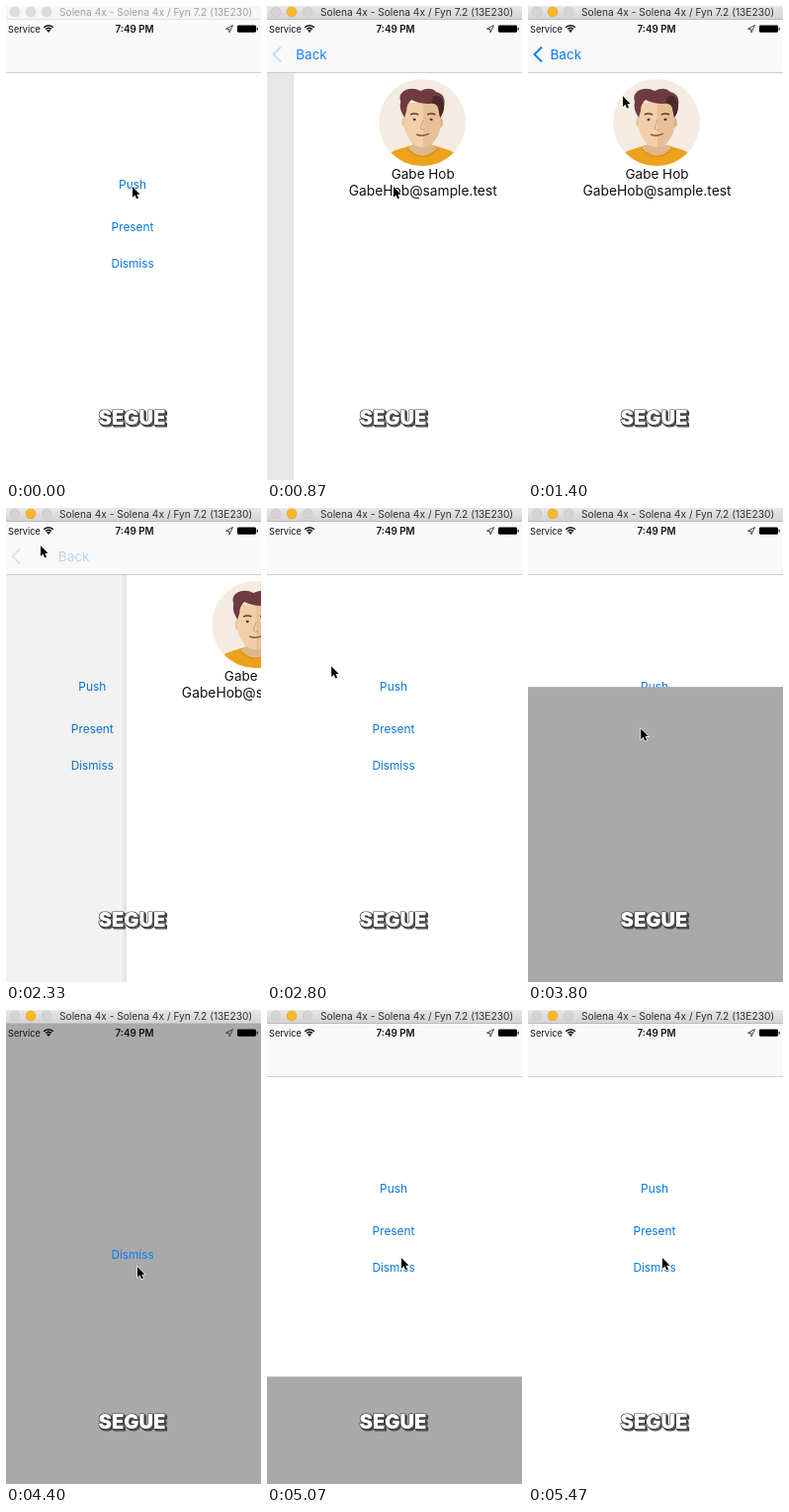
An HTML page with a canvas that plays this animation: 258x480 px, repeating every 5740 ms.

```html
<!DOCTYPE html>
<html lang="en">
<head>
<meta charset="utf-8">
<title>Segue demo</title>
<style>
html, body { margin: 0; width: 100%; height: 100%; overflow: hidden; background: #fff; }
canvas { display: block; width: 258px; height: 480px; }
</style>
</head>
<body>
<canvas id="stage"></canvas>
<script>
const W = 258, H = 480, LOOP = 5740, TOP = 14;
const PUSH = 660, POP = 2247, PRESENT = 3682, DISMISS = 4916;
const LINK = '#0b76d8', TINT = '#087bfa';
const SANS = 'Inter, "Liberation Sans", sans-serif';

const canvas = document.getElementById('stage');
const ratio = window.devicePixelRatio || 1;
canvas.width = W * ratio;
canvas.height = H * ratio;
const c = canvas.getContext('2d');

// Pointer keys: time, x, y
const pointerKeys = [
  [0, 128, 183], [190, 115, 219], [330, 113, 250], [440, 115, 228],
  [610, 128, 183], [880, 128, 183], [1200, 151, 148],
  [1470, 85, 80], [1740, 12, 22], [2070, 35, 38], [2410, 35, 38],
  [2740, 62, 150], [3040, 92, 249], [3330, 106, 232], [3500, 114, 222.5],
  [3760, 114, 222.5], [4200, 122, 264], [4400, 133, 260],
  [4670, 136, 251], [LOOP, 136, 251]
];

const clamp = v => Math.min(1, Math.max(0, v));

// Critically damped spring from 0 to 1
function spring(ms) {
  const x = Math.max(0, ms) * 0.0185;
  return ms > 530 ? 1 : 1 - (1 + x) * Math.exp(-x);
}

function pointerAt(t) {
  const i = Math.max(1, pointerKeys.findIndex(k => k[0] >= t));
  const [t0, x0, y0] = pointerKeys[i - 1], [t1, x1, y1] = pointerKeys[i];
  const u = clamp((t - t0) / (t1 - t0)), e = u * u * (3 - 2 * u);
  return [x0 + (x1 - x0) * e, y0 + (y1 - y0) * e];
}

// Opacity of a button held from down to up, then fading back
function pressAlpha(t, down, up) {
  return t < down ? 1 : 0.2 + 0.8 * clamp((t - up) / 400);
}

function rect(x, y, w, h, color) {
  c.fillStyle = color;
  c.fillRect(x, y, w, h);
}

function disc(x, y, rx, ry, color) {
  c.fillStyle = color;
  c.beginPath();
  c.ellipse(x, y, rx, ry, 0, 0, 7);
  c.fill();
}

function shape(path, color) {
  c.fillStyle = color;
  c.fill(new Path2D(path));
}

function line(path, color, width) {
  c.strokeStyle = color;
  c.lineWidth = width;
  c.stroke(new Path2D(path));
}

function text(str, x, y, size, color, { align = 'center', weight = 400, alpha = 1 } = {}) {
  c.globalAlpha = alpha;
  c.font = `${weight} ${size}px ${SANS}`;
  c.textAlign = align;
  c.fillStyle = color;
  c.fillText(str, x, y);
  c.globalAlpha = 1;
}

function drawAvatar(x, y) {
  c.save();
  c.translate(x, y);
  c.beginPath();
  c.arc(0, 0, 44, 0, 7);
  c.clip();
  rect(-44, -44, 88, 88, '#f4ece3');
  shape('M-40 46 Q-37 30 -24 27 L-11 23 H11 L24 27 Q37 30 40 46Z', '#eda21c');
  shape('M-10 12 H10 V23 L15 26 Q0 41 -15 26 L-10 23Z', '#dfb78c');
  line('M-16 26 Q0 43 16 26', '#d9931a', 1.2);
  disc(-18, 0, 2.8, 5, '#ecc79e');
  disc(18, 0, 2.8, 5, '#dcb287');
  shape('M-18 -20 H18 V6 Q16 16 8 23 Q0 27 -8 23 Q-16 16 -18 6Z', '#f1cfa8');
  shape('M1 -20 H18 V6 Q16 16 8 23 Q4 26 1 25Z', '#e6c096');
  shape('M-18 -5 Q-24 -14 -22 -21 Q-25 -29 -17 -33 Q-9 -36 -2 -32 Q8 -37 14 -31 Q24 -29 22 -17 Q22 -10 18 -5 L16 -15 Q14 -20 7 -19 Q-4 -19 -11 -23 Q-16 -19 -16 -12Z', '#703b40');
  shape('M11 -26 Q19 -30 22 -19 Q22 -10 18 -5 L16 -15 Q15 -19 9 -20Z', '#4b282c');
  line('M-12 -8 Q-8 -10 -4 -8 M5 -8 Q9 -10 13 -8', '#623735', 1.6);
  disc(-8, -3, 1.5, 1.2, '#543331');
  disc(9, -3, 1.5, 1.2, '#543331');
  line('M1 -3 L-2 6 Q0 8 3 7', '#cfa077', 1);
  line('M-6 12 Q1 15 7 11', '#8d4e40', 1.4);
  c.restore();
}

function drawMenu(shift, t) {
  const x = 128 + shift;
  text('Push', x, 185, 11.9, LINK, { alpha: t < 1200 ? pressAlpha(t, 630, 700) : 1 });
  text('Present', x, 228, 11.9, LINK, { alpha: pressAlpha(t, 3520, 3690) });
  text('Dismiss', x, 265, 11.8, LINK);
}

function drawProfile(shown) {
  const left = W * (1 - shown);
  rect(0, TOP, left, H, `rgba(0,0,0,${0.1 * shown})`);
  const shade = c.createLinearGradient(left - 6, 0, left, 0);
  shade.addColorStop(0, 'rgba(0,0,0,0)');
  shade.addColorStop(1, `rgba(0,0,0,${0.16 * (1 - shown)})`);
  rect(left - 6, TOP, 6, H, shade);
  rect(left, TOP, W, H, '#fff');
  drawAvatar(left + 130, 118);
  text('Gabe Hob', left + 130.5, 175, 13.5, '#111');
  text('GabeHob@sample.test', left + 130.5, 192, 13.8, '#111');
}

// The label appears early and the chevron late; both fade out quickly
function drawNavBar(shown, leaving) {
  rect(0, TOP, W, 53, '#f9f9f9');
  rect(0, 67, W, 0.8, '#c4c4c4');
  if (shown < 0.01) return;
  const alpha = shown ** (leaving ? 2 : 0.6);
  text('Back', 22.5 + 64 * (1 - shown), 54, 13.5, TINT, { align: 'left', alpha });
  c.globalAlpha = shown ** (leaving ? 3 : 14);
  line('M14 41.5 L6.5 49 L14 56.5', TINT, 1.9);
  c.globalAlpha = 1;
}

function drawSheet(up, t) {
  const y = TOP + (H - TOP) * (1 - up);
  rect(0, y, W, H - y, '#a9a9a9');
  text('Dismiss', 128, y + 238, 11.8, TINT, { alpha: pressAlpha(t, DISMISS, DISMISS) });
}

function drawStatusBar() {
  text('Service', 2, 27, 9.2, '#111', { align: 'left' });
  text('7:49 PM', 130, 27, 9.8, '#111', { weight: 600 });
  for (const r of [6.3, 3.7]) {
    c.beginPath();
    c.arc(43, 26, r, -Math.PI * 0.77, -Math.PI * 0.23);
    c.strokeStyle = '#111';
    c.lineWidth = 1.6;
    c.stroke();
  }
  shape('M43 27 L41 24.6 Q43 23 45 24.6Z', '#111');
  line('M222.5 23.2 L229.5 19.5 L226 26.8 L225.7 23.5Z', '#333', 0.9);
  c.fillStyle = '#000';
  c.beginPath();
  c.roundRect(234, 19.4, 19, 7.4, 1.4);
  c.fill();
  rect(253.6, 21.8, 1.2, 2.8, '#222');
}

function drawTitleBar(active) {
  const fill = c.createLinearGradient(0, 0, 0, TOP);
  fill.addColorStop(0, active ? '#e8e6e8' : '#f7f7f7');
  fill.addColorStop(1, active ? '#d3d1d3' : '#f4f4f4');
  rect(0, 0, W, TOP, fill);
  rect(0, 13.2, W, 0.8, active ? '#b9b7b9' : '#dedede');
  [9, 25, 41].forEach((x, i) => {
    const lit = active && i === 1;
    disc(x, 5.8, 5.2, 5.2, lit ? '#e2a32a' : active ? '#c8c6c8' : '#d2d2d2');
    disc(x, 5.8, 4.7, 4.7, lit ? '#fdb827' : active ? '#d5d3d5' : '#dddddd');
  });
  text('Solena 4x - Solena 4x / Fyn 7.2 (13E230)', 54, 10, 10.2,
    active ? '#303030' : '#a0a0a0', { align: 'left' });
}

function drawCaption() {
  const word = 'SEGUE', x = 127.5, y = 424;
  c.font = `900 20.2px ${SANS}`;
  c.textAlign = 'center';
  c.lineJoin = 'round';
  c.strokeStyle = '#404040';
  c.lineWidth = 1.2;
  for (let d = 1.8; d >= 0; d -= 0.6) c.strokeText(word, x + d, y + d);
  c.fillStyle = '#fff';
  c.fillText(word, x, y);
  c.lineJoin = 'miter';
}

function drawPointer(x, y) {
  c.save();
  c.translate(x, y);
  c.scale(0.92, 0.92);
  const arrow = 'M0 0 V11.6 L2.7 9.2 L4.5 13.4 L6.5 12.5 L4.7 8.5 L8.2 8.3Z';
  line(arrow, '#fff', 1.4);
  shape(arrow, '#000');
  c.restore();
}

function render(t) {
  const leaving = t >= POP;
  const shown = leaving ? 1 - spring(t - POP) : spring(t - PUSH);
  const up = t < DISMISS ? spring(t - PRESENT) : 1 - spring(t - DISMISS);

  c.setTransform(ratio, 0, 0, ratio, 0, 0);
  rect(0, 0, W, H, '#fff');
  drawMenu(-0.3 * W * shown, t);
  if (shown > 0) drawProfile(shown);
  drawNavBar(shown, leaving);
  if (up > 0) drawSheet(up, t);
  drawStatusBar();
  drawTitleBar(t >= PUSH);
  drawCaption();
  drawPointer(...pointerAt(t));
}

const start = performance.now();
function tick(now) {
  const t = Math.max(0, now - start) % LOOP;
  render(Math.min(82, Math.floor((t + 4) * 0.015)) / 0.015);
  requestAnimationFrame(tick);
}
render(0);
requestAnimationFrame(tick);
</script>
</body>
</html>
```
